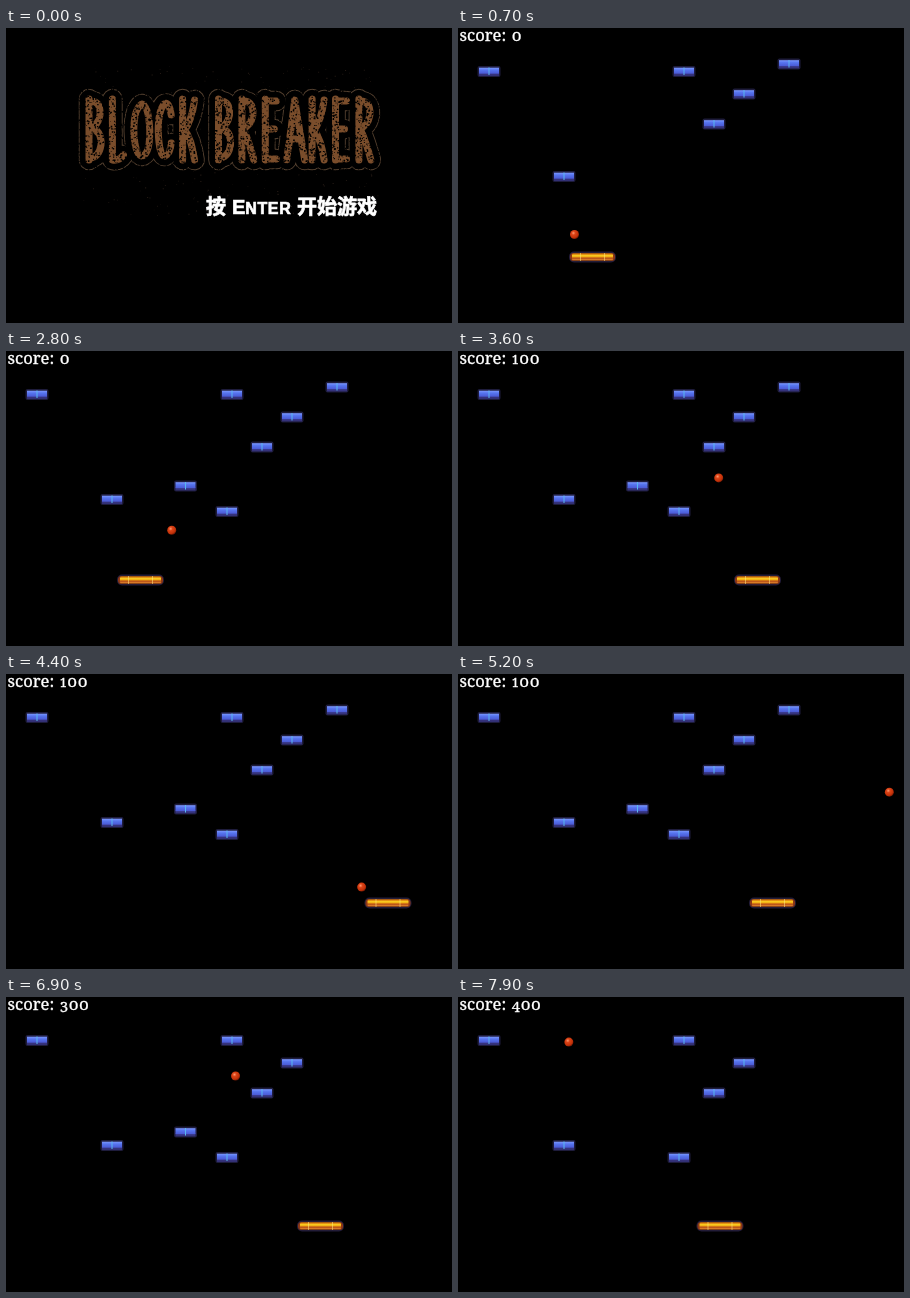
Recreate the animation shown at these times as an HTML page. Size 446 px wide and 295 px high, loop 8 s.

```html
<!DOCTYPE html>
<html lang="zh">
<head>
<meta charset="utf-8">
<title>Block game</title>
<style>
html, body { margin: 0; width: 100%; height: 100%; overflow: hidden; background: #000; }
svg { display: block; width: 446px; height: 295px; }
text { fill: #fff; stroke: #fff; }
#score { font: 16.6px "Noto Serif", serif; stroke-width: .35; }
#prompt { font: 700 20px "Liberation Sans", "Noto Sans CJK SC", "Noto Sans CJK", sans-serif; stroke-width: .7; }
#prompt .small { font-size: 16px; letter-spacing: .6px; }
.letters { fill: none; stroke-linejoin: round; stroke-linecap: round; }
</style>
</head>
<body>
<svg viewBox="0 0 446 295">
  <defs>
    <linearGradient id="blue" x2="0" y2="1">
      <stop offset="0" stop-color="#7c98ff"/>
      <stop offset=".4" stop-color="#5674ee"/>
      <stop offset="1" stop-color="#4a58d4"/>
    </linearGradient>
    <linearGradient id="gold" x2="0" y2="1">
      <stop offset="0" stop-color="#8c4010"/>
      <stop offset=".2" stop-color="#e89814"/>
      <stop offset=".36" stop-color="#ffdc24"/>
      <stop offset=".5" stop-color="#e8940f"/>
      <stop offset=".65" stop-color="#b44c18"/>
      <stop offset=".82" stop-color="#d87a28"/>
      <stop offset="1" stop-color="#5c2610"/>
    </linearGradient>
    <radialGradient id="red" cx=".38" cy=".34" r=".7">
      <stop offset="0" stop-color="#ff9a70"/>
      <stop offset=".3" stop-color="#dc4418"/>
      <stop offset=".75" stop-color="#c03008"/>
      <stop offset="1" stop-color="#601404"/>
    </radialGradient>
    <g id="word"></g>
    <g id="block">
      <rect x="-11.5" y="-5.5" width="23" height="11" rx="2" fill="#1e1c3c"/>
      <rect x="-10" y="1" width="20" height="3.4" fill="#35327c"/>
      <rect x="-10" y="-3.8" width="20" height="6" fill="url(#blue)"/>
      <path d="M0-4V3.5" stroke="#58b8ee"/>
    </g>
  </defs>
  <rect width="446" height="295"/>
  <g id="intro">
    <path id="dust" fill="#241a14"/>
    <g class="letters" role="img" aria-label="BLOCK BREAKER">
      <use href="#word" stroke="#54402f" stroke-width="20.5"/>
      <use href="#word" stroke="#000" stroke-width="18.7"/>
      <use href="#word" stroke="#7a4d2b" stroke-width="7"/>
    </g>
    <path id="wear" fill="#000"/>
    <text id="prompt" y="186"><tspan x="200">按</tspan><tspan x="226">E<tspan class="small">NTER</tspan></tspan><tspan x="291">开始游戏</tspan></text>
  </g>
  <g id="game">
    <g id="blocks"></g>
    <g id="paddle">
      <rect x="-1" y="-5.5" width="47" height="11" rx="5" fill="#221c38"/>
      <rect y="-4" width="45" height="8" rx="3.5" fill="#8c3816"/>
      <rect x="2" y="-4" width="41" height="8" rx="2" fill="url(#gold)"/>
      <path d="M10.5-4V4M34.5-4V4" stroke="#ffe880" opacity=".55"/>
    </g>
    <circle id="ball" r="4.5" fill="url(#red)"/>
    <text id="score" y="13"></text>
  </g>
</svg>
<script>
const $ = id => document.getElementById(id);
const LOOP = 8000, START = 700, FRAME = 100;

// Title letters share a few brush strokes
const stem = "M5 4V65", bowl = "M5 6Q17 5 16 20Q14 31 6 33";
const glyphs = {
  B: stem + bowl + "Q18 35 17 50Q15 63 5 63",
  R: stem + bowl + "Q12 46 17 65",
  K: stem + "M17 5Q14 26 7 35Q14 44 17 65",
  L: stem + "Q12 66 16 60",
  E: stem + "M16 6H5M14 34H5M16 64H5",
  C: "M17 20Q15 6 10 9Q4 16 4 36Q5 62 11 61Q16 59 17 48",
  O: "M11 9Q3 14 3 36Q4 60 11 61Q19 60 19 36Q18 10 11 9Z",
  A: "M3 65Q8 30 11 5Q15 30 21 65M7 44H16"
};
const spell = (word, x) => [...word].map((c, i) =>
  `<path d="${glyphs[c]}" transform="translate(${x + i * 23.4} 67)"/>`).join("");
$("word").innerHTML = spell("BLOCK", 78) + spell("BREAKER", 207.5);

// Seeded specks
let seed = 7;
const rand = () => (seed = seed * 16807 % 2147483647) / 2147483647;
const specks = (n, x, y, w, h, size) => Array.from({ length: n }, () => {
  const s = size * (.5 + rand());
  return `M${x + rand() * w} ${y + rand() * h}h${s}v${s}h${-s}z`;
}).join("");
$("wear").setAttribute("d", specks(4200, 68, 56, 308, 92, 1.1));
$("dust").setAttribute("d", specks(300, 76, 38, 296, 150, .8));

// Block centres; three of them come or go during play
const blocks = [
  { x: 31, y: 43.5 }, { x: 226, y: 43.5 }, { x: 286, y: 66 },
  { x: 256, y: 96 }, { x: 106, y: 148.5 },
  { x: 331, y: 36, to: 6100 },
  { x: 179.5, y: 135, from: 1800, to: 7300 },
  { x: 221, y: 160.5, from: 2000 }
];
for (const b of blocks) {
  b.node = document.createElementNS("http://www.w3.org/2000/svg", "use");
  b.node.setAttribute("href", "#block");
  place(b.node, b.x, b.y);
  $("blocks").append(b.node);
}
const hitTimes = [3450, 6000, 6100, 7300];

function place(node, x, y) {
  node.setAttribute("transform", `translate(${x} ${y})`);
}

// The ball flies at 45 degrees: x turns at the right wall, y at each height below
const launch = { t: 2385, x: 116.5, y: 206.5 }, SPEED = .1187, WALL = 441;
const turns = [217.5, 105.6, 217.5, 28, 34, 3.7, 121.4, 0];

function ballAt(t) {
  const way = Math.max(0, t - launch.t) * SPEED;
  const x = WALL - Math.abs(WALL - launch.x - way);
  let y = launch.y, left = way;
  for (const turn of turns) {
    const step = Math.min(left, Math.abs(turn - y));
    y += Math.sign(turn - y) * step;
    left -= step;
    if (!left) break;
  }
  return [x, y];
}

// Held arrow keys: the paddle steps until the key is let go
const STEP = 7.5, REPEAT = 33;
const keys = [
  { t: 2870, steps: 24, dir: 1 }, { t: 4100, steps: 9, dir: 1 },
  { t: 4900, steps: 9, dir: -1 }, { t: 7100, steps: 7, dir: -1 }
];
const paddleAt = t => keys.reduce((x, k) =>
  x + k.dir * STEP * Math.min(k.steps, Math.max(0, Math.floor((t - k.t) / REPEAT))), 112);

// Old-style numerals: 0 to 2 sit at x-height, the others drop a little
function scoreText(n) {
  let drop = 0, out = '<tspan x="1.5">score:</tspan>';
  [...String(n)].forEach((d, i) => {
    const low = d > 2 ? 2 : 0, size = d > 2 ? 15 : d > 0 ? 12.6 : 17;
    out += `<tspan ${i ? 'dx=".6"' : 'x="53.7"'} dy="${low - drop}" font-size="${size}">${d > 0 ? d : "o"}</tspan>`;
    drop = low;
  });
  return out;
}

const show = (node, on) => node.style.display = on ? "" : "none";
let shownScore = -1;

function draw(time) {
  const t = Math.floor(time % LOOP / FRAME) * FRAME;
  show($("intro"), t < START);
  show($("game"), t >= START);
  place($("ball"), ...ballAt(t));
  place($("paddle"), paddleAt(t), 229);
  for (const { node, from = 0, to = LOOP } of blocks) show(node, t >= from && t < to);
  const score = 100 * hitTimes.filter(h => h <= t).length;
  if (score !== shownScore) $("score").innerHTML = scoreText(shownScore = score);
}

const begin = performance.now();
function tick() {
  draw(performance.now() - begin);
  requestAnimationFrame(tick);
}
tick();
</script>
</body>
</html>
```
